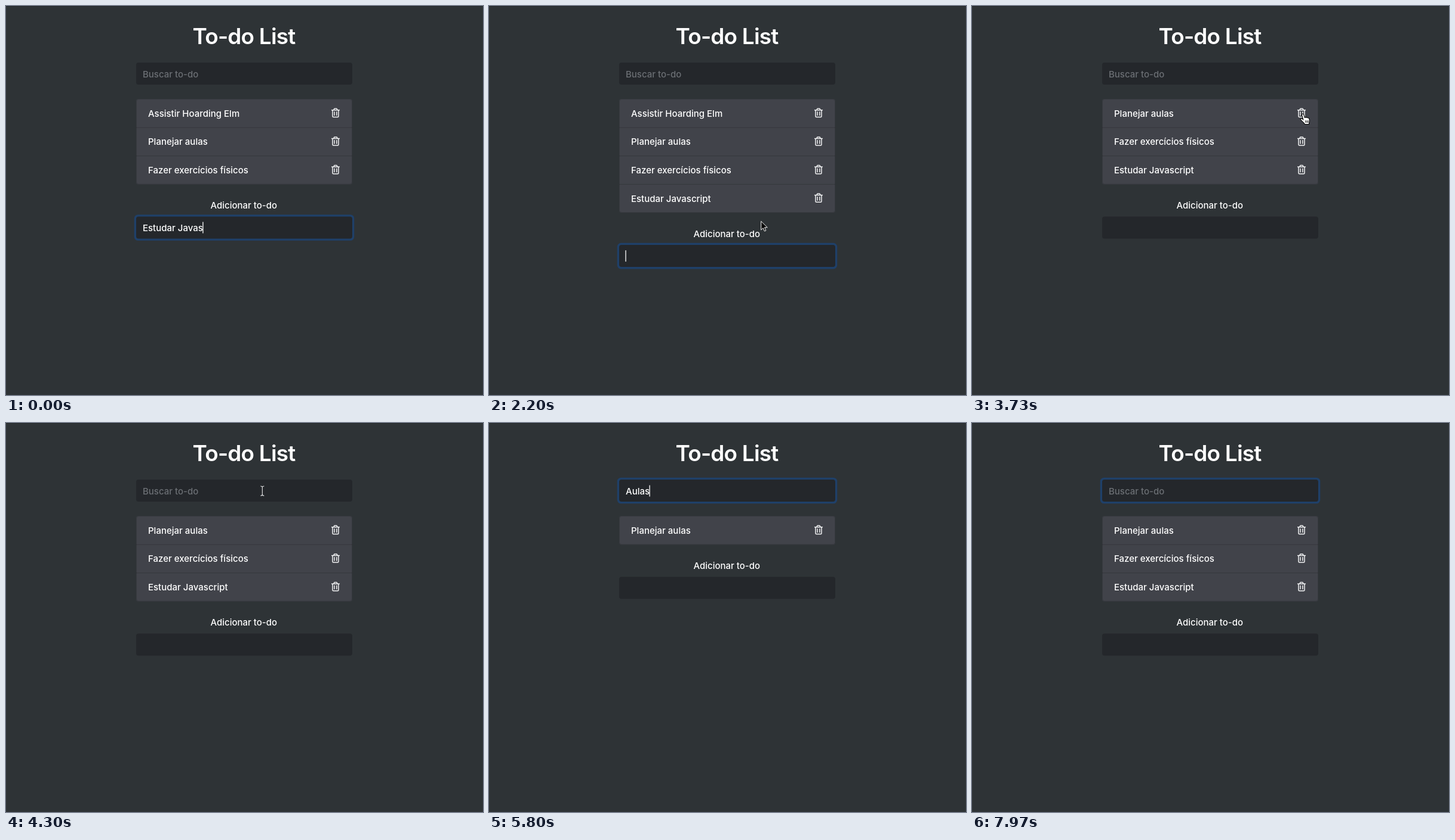
These frames come from a looping animation (799 px wide and 653 px high, 8.01 s). An HTML page:

```html
<!DOCTYPE html>
<html lang="pt">
<head>
<meta charset="utf-8">
<title>To-do List</title>
<style>
  html, body { margin: 0; width: 100%; height: 100%; overflow: hidden; background: #2e3336; }
  svg { display: block; width: 799px; height: 653px; }
  text { font: 450 15px Inter, "Open Sans", sans-serif; font-optical-sizing: none; fill: #fff; white-space: pre; }
  .title { font-size: 37px; font-weight: 600; letter-spacing: -.022em; text-anchor: middle; }
  .label { text-anchor: middle; }
  .hint { fill: #6b6f74; }
  .field { fill: #24272b; }
  .ring { fill: #1f4069; }
  .caret { fill: #fff; }
  .trash { fill: none; stroke: #f1f2f3; stroke-width: 1.5; stroke-linejoin: round; stroke-linecap: round; }
</style>
</head>
<body>
<svg viewBox="0 0 799 653">
  <defs>
    <path id="trash" class="trash" d="M-6.4-4.6H6.4M-3.2-4.8l1.2-2.3h4l1.2 2.3M-5-4.4V5.6q0 1.5 1.5 1.5h7q1.5 0 1.5-1.5V-4.4M-1.9-1.6v5.7M1.9-1.6v5.7"/>
    <rect id="box" class="field" x="218" width="362" height="37" rx="4"/>
    <rect id="glow" class="ring" x="214.7" y="-3.3" width="368.6" height="43.6" rx="6.5"/>
  </defs>
  <rect width="799" height="653" fill="#2e3336"/>
  <rect width="799" height="1" fill="#24282b"/>
  <text class="title" x="398.5" y="63.5">To-do List</text>

  <g id="search" transform="translate(0 95)">
    <use class="halo" href="#glow"/>
    <use href="#box"/>
    <text class="hint" x="229" y="24.6">Buscar to-do</text>
    <text class="value" x="229" y="24.6"></text>
    <rect class="caret" y="9.5" width="1.3" height="19"/>
  </g>

  <rect id="card" x="218" y="156" width="362" rx="4" fill="#41434a"/>
  <g id="rows"></g>
  <rect id="edge" x="218.5" y="156.5" width="361" rx="3.5" fill="none" stroke="#000" stroke-opacity=".14"/>

  <g id="form">
    <text class="label" x="398.3" y="340.4">Adicionar to-do</text>
    <g id="add" transform="translate(0 353.5)">
      <use class="halo" href="#glow"/>
      <use href="#box"/>
      <text class="value" x="229" y="24"></text>
      <rect class="caret" y="9" width="1.3" height="19"/>
    </g>
  </g>

  <g id="cursor">
    <path id="arrow" d="M0 0V14.5l3.4-3.2 2.3 5.3 2.4-1-2.3-5.2h4.7z" fill="#000" stroke="#fff"/>
    <g id="hand" stroke="#000">
      <path d="M-2 1.5Q-2.2-.4-.6-.5 .7-.5 1.2.9L2.7 5.8Q4 4.6 5.3 5.8 6.8 4.9 7.9 6.3 9.8 6 10.4 8 11.3 11 10.4 13.6L9.9 17H3Q1.6 14.6-1 12.4L-4 9.4Q-5 7.4-3.2 7.2-1.8 7.2.2 9z" fill="#fff" stroke-width="1.1"/>
      <path d="M4 10.5l.4 4M6.2 10.5l.3 4M8.4 10.5v4" stroke-width=".9"/>
    </g>
    <path id="beam" d="M-3-8q3 0 3 2V6q0 2-3 2M3-8Q0-8 0-6M0 6q0 2 3 2" fill="none" stroke="#e6e7e8" stroke-width="1.1"/>
  </g>
</svg>
<script>
const LOOP = 8010, PITCH = 47.6, BLINK = 500, FADE = 150;
const $ = (sel, root = document) => root.querySelector(sel);
const items = ["Assistir Hoarding Elm", "Planejar aulas", "Fazer exercícios físicos", "Estudar Javascript"];

// Each step changes part of the state; every step restarts the caret unless "blink" is given.
const steps = [
  [0, { list: [0, 1, 2], focus: "add", search: "", add: "Estudar Javas" }],
  [130, { add: "Estudar Javasc" }],
  [270, { add: "Estudar Javascr" }],
  [410, { add: "Estudar Javascri" }],
  [560, { add: "Estudar Javascrip" }],
  [700, { add: "Estudar Javascript" }],
  [1000, { add: "", list: [0, 1, 2, 3] }],
  [3480, { focus: "" }],
  [3560, { list: [1, 2, 3] }],
  [4450, { focus: "search" }],
  [4860, { search: "A" }],
  [5120, { search: "Au", list: [1] }],
  [5390, { search: "Aul" }],
  [5520, { search: "Aula" }],
  [5650, { search: "Aulas" }],
  [5860, { search: "Aula" }],
  [5960, { search: "Aul" }],
  [6060, { search: "Au" }],
  [6210, { search: "A", list: [1, 2, 3], blink: 6060 }],
  [7100, { search: "" }]
];

// Pointer path: time, x, y
const path = [
  [2150, 450, 372], [2490, 545, 197], [2640, 554.5, 183.5], [3330, 554.5, 183.5],
  [3480, 554.5, 181.5], [3860, 554.5, 181.5], [4160, 430, 114], [4860, 424, 114]
];

const rows = items.map(name => {
  const g = document.createElementNS("http://www.w3.org/2000/svg", "g");
  g.innerHTML = `<rect x="218" y="47.6" width="362" height="1" fill="#35373c"/>
    <text x="238" y="29.8">${name}</text><use href="#trash" x="552" y="23.4"/>`;
  $("#rows").append(g);
  return g;
});

const show = (el, on) => { el.style.display = on ? "" : "none"; };
const clamp = v => Math.min(1, Math.max(0, v));
const ease = u => u * u * (3 - 2 * u);

function stateAt(t) {
  const s = {};
  for (const [at, change] of steps) {
    if (at > t) break;
    Object.assign(s, { blink: at }, change);
  }
  return s;
}

function drawField(id, s, t, glow) {
  const box = $("#" + id), value = $(".value", box), caret = $(".caret", box);
  if (value.textContent !== s[id]) value.textContent = s[id];
  $(".halo", box).style.opacity = glow;
  const on = s.focus === id && Math.floor((t - s.blink) / BLINK) % 2 === 0;
  show(caret, on);
  if (on) caret.setAttribute("x", 228.4 + (s[id] ? value.getComputedTextLength() : 0));
}

function drawList(list) {
  rows.forEach((row, i) => {
    const place = list.indexOf(i);
    show(row, place >= 0);
    row.setAttribute("transform", `translate(0 ${156 + place * PITCH})`);
    show(row.firstChild, place < list.length - 1);
  });
  const h = list.length * PITCH + .6;
  $("#card").setAttribute("height", h);
  $("#edge").setAttribute("height", h - 1);
  $("#form").setAttribute("transform", `translate(0 ${(list.length - 3) * PITCH})`);
}

function drawCursor(t) {
  const i = path.findIndex(p => p[0] > t);
  show($("#cursor"), i > 0);
  if (i < 1) return;
  const [t0, x0, y0] = path[i - 1], [t1, x1, y1] = path[i];
  const u = ease((t - t0) / (t1 - t0));
  const x = x0 + (x1 - x0) * u, y = y0 + (y1 - y0) * u;
  const shape = y < 132 ? "beam" : x > 545 && y > 169 && y < 190 ? "hand" : "arrow";
  for (const id of ["arrow", "hand", "beam"]) show($("#" + id), id === shape);
  $("#cursor").setAttribute("transform", `translate(${x} ${y})`);
}

function render(t) {
  const s = stateAt(t);
  drawList(s.list);
  drawField("search", s, t, clamp((t - 4450) / FADE));
  drawField("add", s, t, 1 - clamp((t - 3480) / FADE));
  show($(".hint"), !s.search);
  drawCursor(t);
}

const start = performance.now();
function tick() {
  render((performance.now() - start) % LOOP);
  requestAnimationFrame(tick);
}
tick();
</script>
</body>
</html>
```
